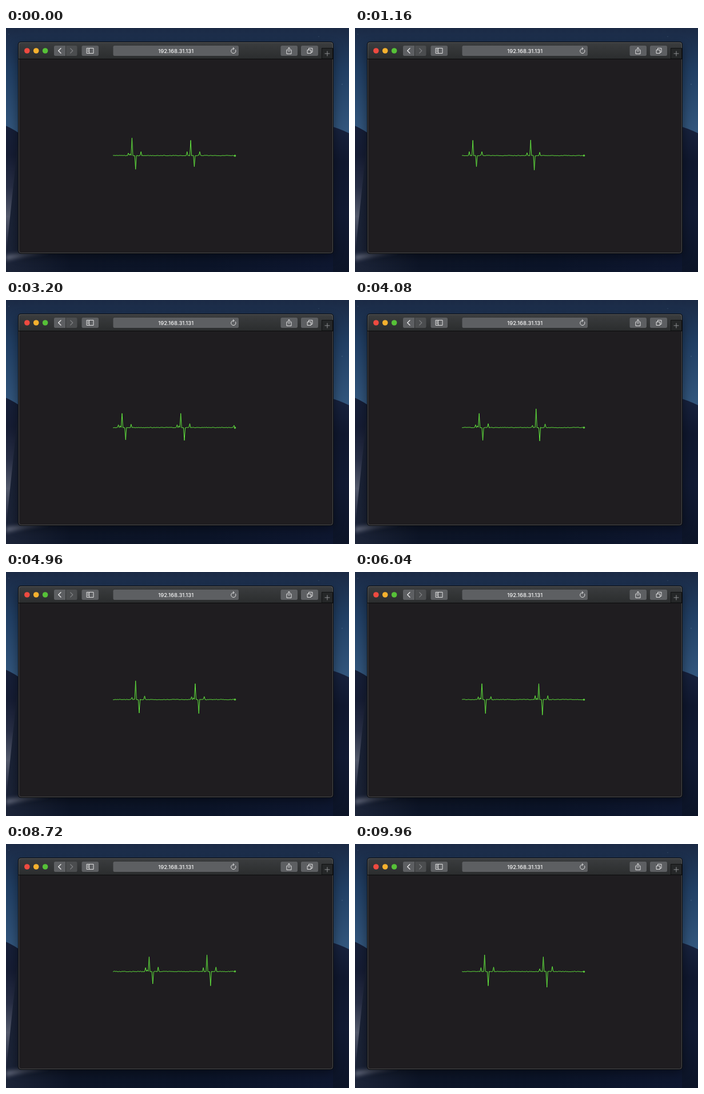
An HTML page for the animation above (10000 ms loop, 600 px wide and 429 px high).

```html
<!DOCTYPE html>
<html lang="en">
<head>
<meta charset="utf-8">
<title>Heartbeat monitor</title>
<style>
  html, body { margin: 0; width: 100%; height: 100%; overflow: hidden; background: #10182c; }
  svg { display: block; width: 100vw; height: 100vh; }
  .icon { fill: none; stroke: #e4e4e5; stroke-width: 1; stroke-linecap: round; stroke-linejoin: round; }
</style>
</head>
<body>
<svg viewBox="0 0 600 429">
  <defs>
    <linearGradient id="sky" x2="0" y2="1">
      <stop offset="0" stop-color="#1b2a45"/>
      <stop offset=".4" stop-color="#213f64"/>
      <stop offset="1" stop-color="#34587f"/>
    </linearGradient>
    <linearGradient id="left" x2="0" y2="1">
      <stop offset="0" stop-color="#161f38"/>
      <stop offset=".2" stop-color="#161d34"/>
      <stop offset=".42" stop-color="#282f46"/>
      <stop offset=".62" stop-color="#545a6c"/>
      <stop offset=".8" stop-color="#2c3248"/>
      <stop offset="1" stop-color="#121a2f"/>
    </linearGradient>
    <linearGradient id="right" x2="0" y2="1">
      <stop offset="0" stop-color="#18233f"/>
      <stop offset=".25" stop-color="#10182f"/>
      <stop offset=".6" stop-color="#111a33"/>
      <stop offset="1" stop-color="#0c1427"/>
    </linearGradient>
    <linearGradient id="floor">
      <stop offset="0" stop-color="#1c2438"/>
      <stop offset=".2" stop-color="#0d1527"/>
      <stop offset=".6" stop-color="#0b1428"/>
      <stop offset="1" stop-color="#0e1730"/>
    </linearGradient>
    <linearGradient id="streak">
      <stop offset="0" stop-color="#5a6072"/>
      <stop offset="1" stop-color="#2c3448"/>
    </linearGradient>
    <linearGradient id="bar" x2="0" y2="1">
      <stop offset="0" stop-color="#3b3d3f"/>
      <stop offset="1" stop-color="#2b2d2e"/>
    </linearGradient>
    <filter id="blur" x="-20%" y="-20%" width="140%" height="140%"><feGaussianBlur stdDeviation="9"/></filter>
    <filter id="soft" x="-20%" y="-50%" width="140%" height="200%"><feGaussianBlur stdDeviation="3"/></filter>
  </defs>

  <!-- desktop -->
  <rect width="600" height="190" fill="url(#sky)"/>
  <path d="M0 172Q14 178 30 190V429H0Z" fill="url(#left)"/>
  <path d="M560 170Q582 176 600 185V429H560Z" fill="url(#right)"/>
  <path d="M22 190H572V429H0V400Z" fill="url(#floor)"/>
  <path d="M0 409Q36 400 78 395L40 394L0 399Z" fill="url(#streak)" filter="url(#soft)"/>
  <g fill="#8ea6c4" opacity=".45">
    <circle cx="5" cy="11" r=".6"/><circle cx="547" cy="15" r=".6"/><circle cx="588" cy="99" r=".7"/>
  </g>
  <rect x="20" y="31" width="554" height="371" rx="6" opacity=".42" filter="url(#blur)"/>

  <!-- window -->
  <rect x="21" y="24" width="552" height="373" rx="5" fill="#0a0b0d"/>
  <rect x="22" y="25" width="550" height="371" rx="4" fill="#1f1d20"/>
  <path d="M22 54V29Q22 25 26 25H568Q572 25 572 29V54Z" fill="url(#bar)"/>
  <rect x="22.5" y="25.5" width="549" height="370" rx="4" fill="none" stroke="#6b6e70" stroke-opacity=".55"/>
  <path d="M22 54.5H572" stroke="#0b0b0c"/>
  <circle cx="36.8" cy="40" r="4.8" fill="#ee4a40"/>
  <circle cx="52.7" cy="40" r="4.8" fill="#f5b12e"/>
  <circle cx="68.6" cy="40" r="4.8" fill="#56c138"/>

  <g fill="#5d5f62">
    <path d="M86.500 31H104V49H86.500Q84 49 84 46.500V33.500Q84 31 86.500 31Z"/>
    <path d="M105 31H122Q124.500 31 124.500 33.500V46.500Q124.500 49 122 49H105Z" fill="#4b4d4f"/>
    <rect x="132.500" y="31" width="29.500" height="18" rx="2.500"/>
    <rect x="187.500" y="31" width="219.500" height="18" rx="2.500"/>
    <rect x="480.500" y="31" width="29.500" height="18" rx="2.500"/>
    <rect x="516" y="31" width="30" height="18" rx="2.500"/>
  </g>
  <g class="icon">
    <path d="M96 35.700L91.700 40L96 44.300" stroke-width="1.400"/>
    <path d="M112.700 35.900L116.800 40L112.700 44.100" stroke="#808284" stroke-width="1.200"/>
    <path d="M141.500 35.500H153V44.500H141.500ZM145.500 35.500V44.500M143 37.500H144M143 39.500H144M143 41.500H144"/>
    <path d="M493 38.500H491V45.500H499V38.500H497M495 42V34.500M492.800 36.500L495 34.300L497.200 36.500"/>
    <path d="M527.500 38.500H533.500V44.500H527.500ZM529.500 38V35.500H536V42.500H534"/>
    <path d="M401.700 38.600A4.200 4.200 0 1 1 398.200 36.200M397.200 34.300L399.300 36.200L397.200 38.100"/>
  </g>
  <path d="M552.500 54V35.500H571.500V54Z" fill="#252728" stroke="#111213"/>
  <path d="M557.500 45H566.500M562 40.500V49.500" stroke="#909294"/>
  <text x="297.200" y="43.600" text-anchor="middle" font-family="Inter, Roboto, sans-serif" font-size="9.500" font-weight="500" fill="#f4f4f4">192.168.31.131</text>

  <!-- trace -->
  <path id="trace" fill="none" stroke="#62e83e" stroke-width="1" stroke-linejoin="bevel"/>
  <circle id="head" cx="400.500" r="1.800" fill="#59c43c"/>
</svg>
<script>
const LOOP = 10000, TICK = 40, RATE = 0.06398;
const RIGHT = 400.5, BASE = 224.4, STEP = 1.58, COUNT = 135;

// sample index of the peak, then heights: first bump, second bump, peak, dip, last bump
const beats = [
  [-114, 4.5, 3, 31, 24, 7],
  [-49, 7, 0, 27, 19.5, 7],
  [15, 5, 0, 27.5, 25.5, 6],
  [80, 5, 3, 25, 21.5, 6],
  [145, 5, 3, 25, 22.5, 7],
  [208, 4, 0, 33, 23.5, 6.5],
  [274, 5, 3, 28, 24.5, 5.5],
  [337, 7, 2.5, 28, 27, 7],
  [401, 5, 2, 26, 22, 9],
  [463, 7, 3, 26, 21.5, 8],
  [527, 7, 0, 29.5, 25, 8],
  [592, 5, 0, 26, 27.5, 9]
];

const heights = new Map();
for (const [at, p, q, r, s, t] of beats) {
  [[-4, p], [-2, q], [0, r], [4, -s], [10, t]].forEach(([d, h]) => h && heights.set(at + d, h));
}

function noise(i) {
  const n = Math.sin(i * 127.1 + 31.7) * 43758.5453;
  return (n - Math.floor(n) - 0.35) * 1.1;
}

const sampleY = i => BASE - (heights.has(i) ? heights.get(i) : noise(i));

const trace = document.getElementById("trace");
const head = document.getElementById("head");

function draw(ms) {
  const t = Math.floor((ms % LOOP) / TICK) * TICK;
  const last = Math.floor(t * RATE + 0.7);
  const points = [];
  for (let k = COUNT; k >= 0; k--) {
    points.push((RIGHT - k * STEP).toFixed(2) + " " + sampleY(last - k).toFixed(2));
  }
  trace.setAttribute("d", "M" + points.join("L"));
  head.setAttribute("cy", sampleY(last).toFixed(2));
}

const start = performance.now();
function loop() {
  draw(performance.now() - start);
  requestAnimationFrame(loop);
}
loop();
</script>
</body>
</html>
```
